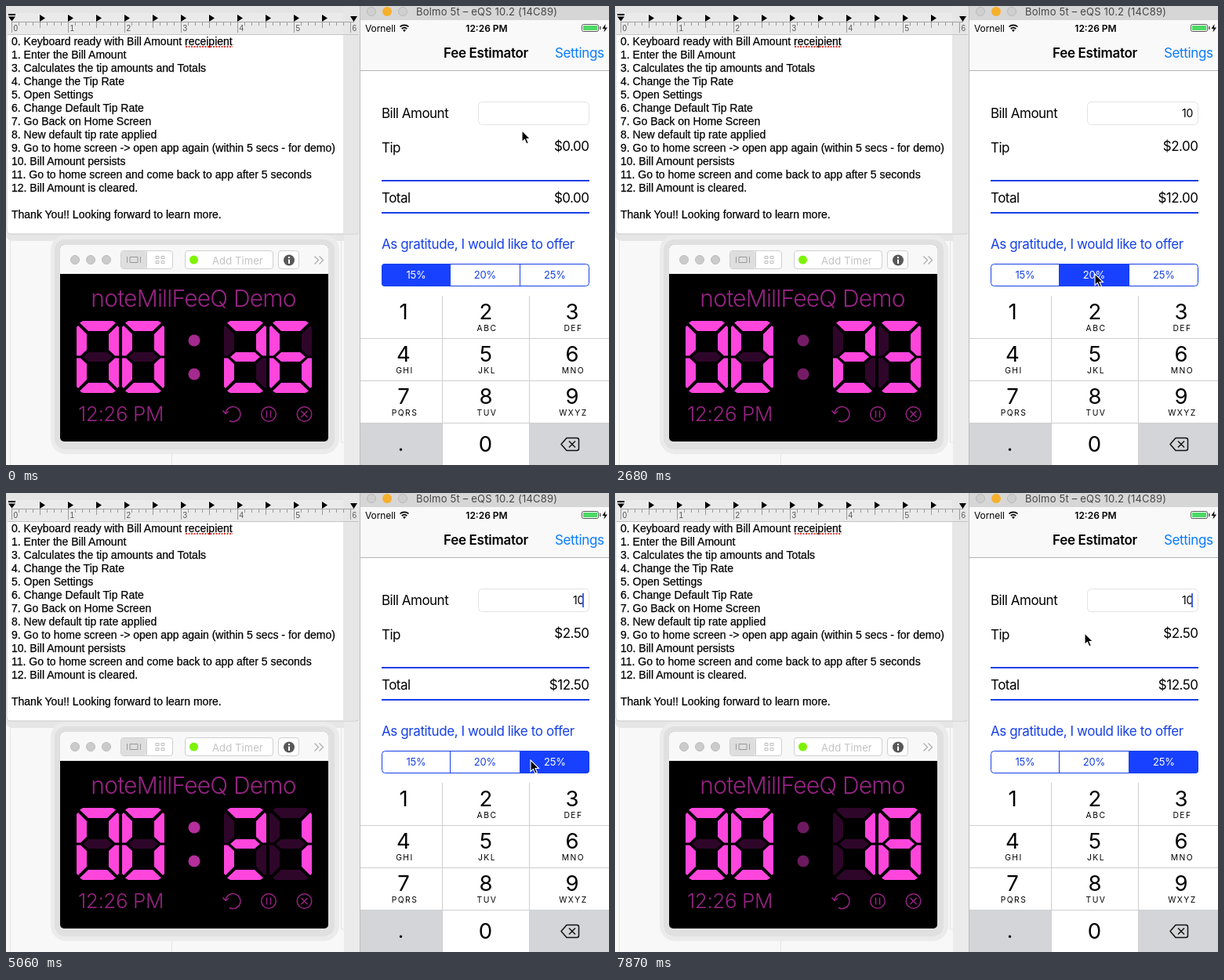
An HTML page for the animation above (8000 ms loop, 769 px wide and 586 px high).

```html
<!DOCTYPE html>
<html lang="en">
<head>
<meta charset="utf-8">
<title>Screen demo</title>
<style>
  html, body { margin: 0; width: 100%; height: 100%; overflow: hidden; background: #f8f8f8; }
  svg { display: block; }
  text { font-family: Inter, Roboto, sans-serif; white-space: pre; }
  .note { font-family: "Liberation Sans", sans-serif; }
  .line { stroke: #000; stroke-width: .25; }
</style>
</head>
<body>
<svg id="stage" width="769" height="586" viewBox="0 0 769 586"></svg>
<script>
const LOOP = 8000, STEP = 148.5;
const BLUE = '#1841ff', INK_BLUE = '#1740e6', PINK = '#ff46dc', DIM = '#2e062a', PLUM = '#962383';

const attrs = o => Object.entries(o).map(([k, v]) => `${k}="${v}"`).join(' ');
const rect = (x, y, width, height, fill, more = {}) =>
  `<rect ${attrs({ x, y, width, height, fill, ...more })}/>`;
const circle = (cx, cy, r, fill, more = {}) => `<circle ${attrs({ cx, cy, r, fill, ...more })}/>`;
const path = (d, more = {}) => `<path ${attrs({ d, fill: 'none', ...more })}/>`;
const text = (x, y, size, content, more = {}) =>
  `<text ${attrs({ x, y, 'font-size': size, ...more })}>${content}</text>`;
const middle = { 'text-anchor': 'middle' }, end = { 'text-anchor': 'end' };
const tracking = n => ({ 'letter-spacing': n });
const range = n => [...Array(n).keys()];

function desktop() {
  return rect(0, 0, 769, 586, '#f8f8f8')
    + path('M5.5 290V586M211.5 290V586M427.5 290V557H452', { stroke: '#e4e4e4' })
    + rect(0, 285, 452, 15, '#e6e6e6', { rx: 8 })
    + rect(57, 292, 368, 280, '#ebebeb', { rx: 20 })
    + rect(62, 298, 357, 268, '#e0e0e0', { rx: 14 })
    + rect(431, 0, 21, 586, '#ebebeb');
}

function notes() {
  const lines = [
    '0. Keyboard ready with Bill Amount receipient', '1. Enter the Bill Amount',
    '3. Calculates the tip amounts and Totals', '4. Change the Tip Rate', '5. Open Settings',
    '6. Change Default Tip Rate', '7. Go Back on Home Screen', '8. New default tip rate applied',
    '9. Go to home screen -&gt; open app again (within 5 secs - for demo)',
    '10. Bill Amount persists', '11. Go to home screen and come back to app after 5 seconds',
    '12. Bill Amount is cleared.', '', 'Thank You!! Looking forward to learn more.'];
  const ticks = range(49).map(i => `M${7.5 + i * 9} 21v${i % 8 ? (i % 4 ? 4 : 7) : 13}`).join('');
  const tabs = range(11).map(i => `M${43 + i * 36} 11v9l7 -4.5z`).join('');
  return path('M1 0H451V286Q451 291 446 291H6Q1 291 1 286Z', { fill: '#fff', stroke: '#c9c9c9' })
    + rect(2, 0, 449, 9, '#e4e4e4') + rect(2, 9, 449, 27, '#eaeaea')
    + rect(430, 0, 21, 290, '#e6e6e6')
    + path('M2 36.5H450', { stroke: '#c4c4c4' })
    + path('M7 20.5H444', { stroke: '#a5a5a5' })
    + path(ticks, { stroke: '#9a9a9a' })
    + path(tabs + 'M3 10h9v2h-9zM3 13.5h9l-4.5 6zM439 13h9l-4.5 7z', { fill: '#000' })
    + range(7).map(i => text(9.5 + i * 72, 32, 10, i, { class: 'note', fill: '#555' })).join('')
    + lines.map((s, i) => text(7, 50 + i * 17, 14, s, { class: 'note line' })).join('')
    + path('M229 52H289', { stroke: '#e8382f', 'stroke-width': 2, 'stroke-dasharray': '2 1.5' });
}

// Segments a-g on a 54 by 92 cell
const SEGMENTS = [
  '8,0 46,0 50,2.5 39,13 15,13 4,2.5',
  '54,8 52,6 41,17 41,37 49,44.5 54,44.5',
  '54,84 52,86 41,75 41,55 49,47.5 54,47.5',
  '8,92 46,92 50,89.5 39,79 15,79 4,89.5',
  '0,84 2,86 13,75 13,55 5,47.5 0,47.5',
  '0,8 2,6 13,17 13,37 5,44.5 0,44.5',
  '8,46 15,40 39,40 46,46 39,52 15,52'];
const LIT = ['abcdef', 'bc', 'abdeg', 'abcdg', 'bcfg', 'acdfg', 'acdefg', 'abc', 'abcdefg', 'abcdfg'];
const isLit = (digit, i) => LIT[digit].includes('abcdefg'[i]);

const digitCell = (x, id) => `<g id="${id}" transform="translate(${x} 402)">`
  + SEGMENTS.map((points, i) => `<polygon points="${points}" fill="${isLit(0, i) ? PINK : DIM}"/>`).join('')
  + '</g>';

function timer() {
  const line = { stroke: PLUM, 'stroke-width': 1.5 };
  const button = { stroke: '#d0d0d0', rx: 3.5 };
  return rect(69, 305, 342, 251, '#000', { rx: 5 })
    + path('M69 342V310Q69 305 74 305H406Q411 305 411 310V342Z', { fill: '#f8f8f8' })
    + [88, 108, 128].map(x => circle(x, 324, 5.5, '#cbcbcb', { stroke: '#bcbcbc' })).join('')
    + rect(146.5, 312.5, 66, 23, '#fff', button) + rect(147, 313, 32, 22, '#dedede', { rx: 3 })
    + path('M179.5 313V335', { stroke: '#d0d0d0' })
    + path('M154.5 320v8M171.5 320v8M158 320.5h10v7h-10z', { stroke: '#999' })
    + path('M191 319.5h4v3h-4zM198 319.5h4v3h-4zM191 325.5h4v3h-4zM198 325.5h4v3h-4z', { stroke: '#bbb' })
    + rect(228.5, 312.5, 112, 23, '#fff', button) + circle(239.5, 324, 5.5, '#7df303')
    + text(263, 330, 13, 'Add Timer', { fill: '#c3c3c3', ...tracking(.1) })
    + rect(347.5, 312.5, 26, 23, '#fff', button) + circle(361, 324.5, 7, '#585858')
    + path('M361 320v2M361 323.5v5.5', { stroke: '#fff', 'stroke-width': 2 })
    + path('M393.5 319.5l5 5l-5 5M399.5 319.5l5 5l-5 5', { stroke: '#aaa', 'stroke-width': 1.2 })
    + text(239, 384, 30, 'noteMillFeeQ Demo', { fill: PLUM, 'font-weight': 300, ...middle, ...tracking(-.8) })
    + digitCell(90, 'minuteTens') + digitCell(148, 'minuteOnes')
    + digitCell(278, 'tens') + digitCell(336, 'ones')
    + [427, 470].map(y => circle(240, y, 7.5, DIM) + circle(240, y, 7.5, PINK, { class: 'colon' })).join('')
    + text(92, 530, 26, '12:26 PM', { fill: PLUM, 'font-weight': 300, ...tracking(-.4) })
    + path('M280 520A9.5 9.5 0 1 1 285 529.5M276.5 516.5l3.5 4l4 -3', line)
    + circle(335, 521, 9.3, 'none', line) + path('M332.5 516.5v9M337.5 516.5v9', line)
    + circle(380.5, 521, 9.3, 'none', line) + path('M376.5 517l8 8M384.5 517l-8 8', line);
}

function keypad() {
  const letters = ['', 'ABC', 'DEF', 'GHI', 'JKL', 'MNO', 'PQRS', 'TUV', 'WXYZ'];
  const columns = [507, 612, 722];
  const keys = letters.map((s, i) => {
    const x = columns[i % 3], y = 399.5 + 54 * Math.floor(i / 3);
    return text(x, y, 27.5, i + 1, middle)
      + text(x + 1.5, y + 15.5, 10.3, s, { ...middle, ...tracking(1.5) });
  }).join('');
  return rect(452, 370, 317, 216, '#fff')
    + rect(452, 533, 104, 53, '#d3d5d8') + rect(668, 533, 101, 53, '#d3d5d8')
    + path('M556.5 370V586M667.5 370V586M452 424.5H769M452 478.5H769M452 532.5H769', { stroke: '#cfcfcf' })
    + keys + text(503.5, 568, 26, '.', middle) + text(611.5, 569, 27.5, '0', middle)
    + path('M708 559.5l7 -8h13q2.5 0 2.5 2.5v11q0 2.5 -2.5 2.5h-13zM718 555.5l8 8M726 555.5l-8 8',
      { stroke: '#111', 'stroke-width': 1.5, 'stroke-linejoin': 'round' });
}

function phone() {
  const t = tracking(-.5);
  return rect(451, 0, 318, 586, '#fff')
    + rect(451, 0, 318, 18, '#d6d6d6') + path('M451.5 0V586', { stroke: '#bdbdbd' })
    + [466, 506].map(x => circle(x, 7, 5.5, '#cfcfcf', { stroke: '#b9b9b9' })).join('')
    + circle(486, 7, 6, '#f7b02c')
    + text(523, 12, 13, 'Bolmo 5t – eQS 10.2 (14C89)', { fill: '#464646', ...tracking(.2) })
    + rect(452, 18, 317, 64, '#f9f9f9') + path('M452 82.5H769', { stroke: '#b4b4b4' })
    + text(458, 32.5, 12, 'Vornell', tracking(-.1))
    + path('M502.5 26.5a8 8 0 0 1 11 0M504.7 29a5 5 0 0 1 6.6 0', { stroke: '#000', 'stroke-width': 1.7 })
    + path('M506 30.8q2 -1.5 4 0l-2 2.2z', { fill: '#000' })
    + text(613, 32.5, 12, '12:26 PM', { 'font-weight': 600, ...middle })
    + rect(734.5, 23.5, 21, 9, '#fff', { rx: 2, stroke: '#555' }) + rect(736, 25, 18, 6, '#4cd964')
    + rect(757, 26, 1.5, 4, '#555') + path('M764.5 23l-4 6h3l-1 4.5l4.5 -6h-3z', { fill: '#000' })
    + text(612, 66, 17, 'Fee Estimator', { 'font-weight': 600, ...middle, ...tracking(-.3) })
    + text(700, 66, 17, 'Settings', { fill: '#0a7bff', ...tracking(-.35) })
    + text(479, 143, 17, 'Bill Amount', t) + text(479, 187, 17, 'Tip', t) + text(479, 251, 17, 'Total', t)
    + rect(602.5, 122.5, 141, 29, '#fff', { rx: 5, stroke: '#e3e3e3' })
    + text(737, 141.5, 14, '', { id: 'bill', ...end, ...tracking(-.3) })
    + rect(735, 128, 2, 18, '#3f62f2', { id: 'caret' })
    + text(743.5, 184.5, 17, '', { id: 'tip', ...end, ...t })
    + text(743.5, 250.5, 17, '', { id: 'total', ...end, ...t })
    + rect(479, 222, 265, 2, INK_BLUE) + rect(479, 263, 265, 2, INK_BLUE)
    + text(479, 310, 17, 'As gratitude, I would like to offer', { fill: INK_BLUE, ...tracking(-.4) })
    + `<clipPath id="pill">${rect(479, 329, 265, 29, '#fff', { rx: 4 })}</clipPath>`
    + rect(479, 329, 88, 29, BLUE, { id: 'selected', 'clip-path': 'url(#pill)' })
    + rect(479.5, 329.5, 264, 28, 'none', { rx: 4, stroke: INK_BLUE })
    + path('M566.5 329V358M655.5 329V358', { stroke: INK_BLUE })
    + [523, 611, 700].map((x, i) =>
      text(x, 348, 13, `${15 + 5 * i}%`, { class: 'rate', ...middle, ...tracking(-.2) })).join('')
    + keypad();
}

const pointer = path('M0 0V14.5L3.4 11.4L5.8 17L8.3 16L6 10.5H10.5Z',
  { id: 'pointer', fill: '#000', stroke: '#fff', 'stroke-width': 1.1 });

document.getElementById('stage').innerHTML = desktop() + notes() + timer() + phone() + pointer;

const $ = id => document.getElementById(id);
const rateLabels = document.querySelectorAll('.rate'), colons = document.querySelectorAll('.colon');

// Pointer stops: time, x, y
const STOPS = [
  [0, 658, 159], [1200, 655, 182], [1790, 655, 182], [2380, 613, 342], [2700, 612, 342],
  [3200, 689, 341], [3600, 689, 341], [3800, 687, 341], [4500, 687, 341], [5000, 669, 341],
  [5100, 669, 341], [5850, 717, 58], [7050, 717, 58], [7860, 599, 179], [LOOP, 599, 179]];

function pointerAt(t) {
  const i = STOPS.findIndex(s => s[0] > t);
  const [t0, x0, y0] = STOPS[i - 1], [t1, x1, y1] = STOPS[i];
  const u = (t - t0) / (t1 - t0), k = u * u * (3 - 2 * u);
  return [x0 + (x1 - x0) * k, y0 + (y1 - y0) * k].map(Math.round);
}

function caretAt(t) {
  const phase = (t + 320) % 900;
  if (phase < 200) return 1 - Math.max(0, phase - 160) / 40;
  return Math.max(0, Math.min(1, (phase - 370) / 70));
}

function showDigit(id, digit) {
  [...$(id).children].forEach((s, i) => s.setAttribute('fill', isLit(digit, i) ? PINK : DIM));
}

function draw(t) {
  const seconds = 26 - Math.floor((t + 500) / 1000);
  showDigit('tens', Math.floor(seconds / 10));
  showDigit('ones', seconds % 10);
  const pulse = (t + 220) % 1000 / 1000;
  const glow = (1 - Math.abs(2 * pulse - 1)) ** .7;
  colons.forEach(c => c.setAttribute('opacity', glow));

  const bill = t < 500 ? 0 : t < 800 ? 1 : 10;
  const choice = t < 2600 ? 0 : t < 3800 ? 1 : 2;
  const tip = bill * (15 + 5 * choice) / 100;
  $('bill').textContent = bill || '';
  $('tip').textContent = '$' + tip.toFixed(2);
  $('total').textContent = '$' + (bill + tip).toFixed(2);
  $('caret').setAttribute('opacity', caretAt(t));

  $('selected').setAttribute('x', [479, 566, 655][choice]);
  $('selected').setAttribute('width', [88, 90, 89][choice]);
  rateLabels.forEach((label, i) => label.setAttribute('fill', i === choice ? '#fff' : INK_BLUE));
  $('pointer').setAttribute('transform', `translate(${pointerAt(t)})`);
}

const start = performance.now();
function tick() {
  const t = Math.max(0, performance.now() - start) % LOOP;
  draw(Math.floor((t + 10) / STEP) * STEP);
  requestAnimationFrame(tick);
}
tick();
</script>
</body>
</html>
```
